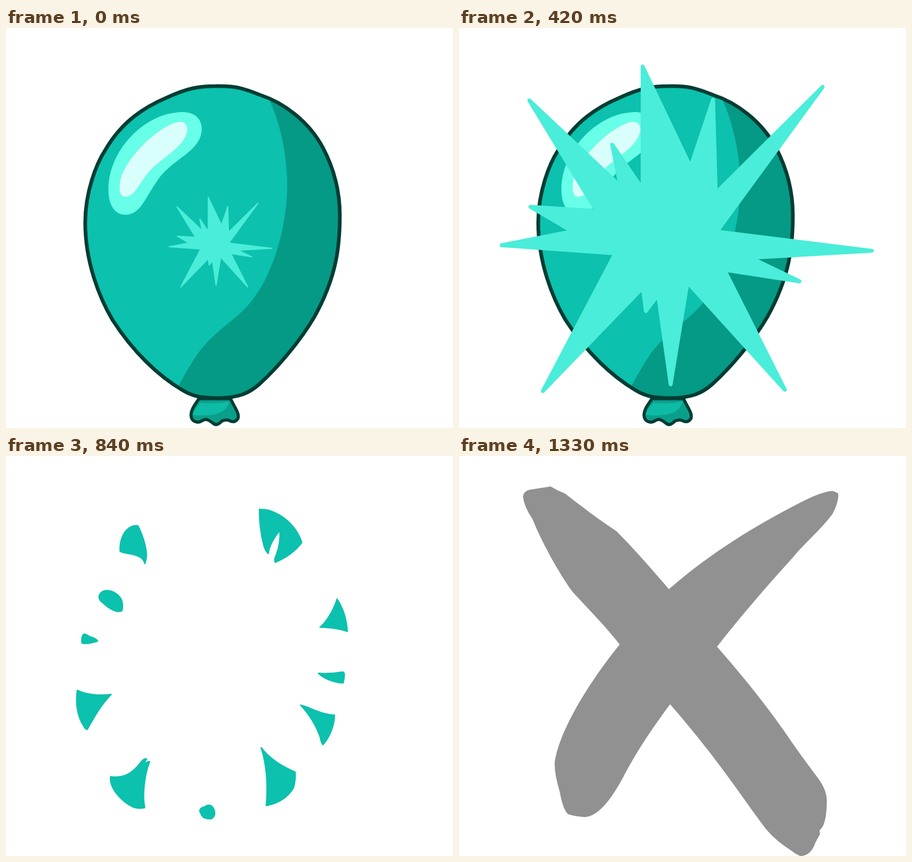
These frames come from a looping animation (790 px wide and 709 px high, 1400 ms). An HTML page with a canvas:

```html
<!DOCTYPE html>
<html lang="en">
<head>
<meta charset="utf-8">
<title>Balloon pop</title>
<style>
html, body { margin: 0; width: 100%; height: 100%; overflow: hidden; background: #fff; }
canvas { display: block; width: 790px; height: 709px; }
</style>
</head>
<body>
<canvas id="stage" width="790" height="709"></canvas>
<script>
const ctx = document.getElementById('stage').getContext('2d');
const STEP = 70, STEPS = 20, POP = 8, GONE = 16, CROSS = 19;
const BASE = '#0cc1ad', SHADE = '#059a86', LINE = '#003d33', BURST = '#4aedd9';
const GLOW = '#67ffe8', SHINE = '#d9fffc';

const shape = d => new Path2D(d);

function dot(x, y, r) {
  const path = new Path2D();
  path.arc(x, y, r, 0, Math.PI * 2);
  return path;
}

function fill(path, color) {
  ctx.fillStyle = color;
  ctx.fill(path);
}

function stroke(path, color, width) {
  ctx.strokeStyle = color;
  ctx.lineWidth = width;
  ctx.stroke(path);
}

function fillInside(clip, path, color) {
  ctx.save();
  ctx.clip(clip);
  fill(path, color);
  ctx.restore();
}

// Balloon
const body = shape('M371 103C405 102 420 107 450 119C490 132 535 165 560 212C580 250 590 290 590 332C590 385 585 440 545 512C520 555 480 602 448 631C430 647 412 656 371 656C345 656 328 652 312 642C270 617 225 575 188 517C165 478 140 415 140 345C140 290 160 240 175 217C205 165 245 140 285 123C320 107 340 103 371 103Z');
const bodyShade = shape('M465 126C485 170 497 225 497 280C496 340 482 400 455 452C425 505 400 515 370 543C340 570 330 590 306 632V720H700V100Z');
const glow = shape('M300 150C325 146 346 155 346 179C345 220 295 230 268 270C245 302 238 331 211 331C190 331 181 310 181 287C181 215 245 155 300 150Z');
const shine = shape('M300 169C313 165 320 171 319 182C314 210 280 225 255 250C235 272 228 297 211 298C202 298 201 285 203 272C210 235 262 182 300 169Z');
const knot = shape('M341 657C334 668 327 676 327 686C327 697 337 701 345 697Q351 693 355 694Q360 696 364 699Q371 706 378 700Q382 695 388 695Q393 694 397 697Q405 700 410 692C413 682 402 670 397 657Z');
const knotLight = shape('M343 664Q370 667 395 662C390 684 365 689 330 686C331 678 338 672 343 664Z');

function drawBalloon() {
  fill(knot, '#0a9f8b');
  fill(knotLight, '#0dbba6');
  stroke(knot, LINE, 5.5);
  fill(body, BASE);
  fillInside(body, bodyShade, SHADE);
  fill(glow, GLOW);
  fill(shine, SHINE);
  stroke(shine, '#e6f9fa', 2.5);
  stroke(body, LINE, 6.5);
}

// Burst: tips and notches clockwise around its middle; one outline, scaled over time
const MID = [377, 382], EDGE = 7;
const spikes = [
  [324, 65], [410, 243], [450, 124], [456, 290], [645, 102], [459, 360], [733, 395],
  [519, 408], [605, 450], [472, 430], [578, 644], [405, 454], [374, 635], [351, 476],
  [329, 505], [323, 463], [146, 646], [273, 400], [72, 385], [197, 360], [123, 316],
  [240, 323], [122, 126], [283, 278], [269, 204], [323, 283]];
const burst = new Path2D();
for (const [x, y] of spikes) {
  const dx = x - MID[0], dy = y - MID[1];
  const inset = 1 - EDGE / 2 / Math.hypot(dx, dy);
  burst.lineTo(dx * inset, dy * inset);
}
burst.closePath();

const growth = [
  { step: 0, x: 372, y: 387, size: .277 },
  { step: 4, x: 377, y: 382, size: .493 },
  { step: 6, x: 377, y: 382, size: 1 },
  { step: 7, x: 370, y: 376, size: 1.135 }];

function drawBurst(step) {
  const i = Math.max(1, growth.findIndex(g => g.step >= step));
  const a = growth[i - 1], b = growth[i], k = (step - a.step) / (b.step - a.step);
  const at = key => a[key] + (b[key] - a[key]) * k;
  ctx.save();
  ctx.translate(at('x'), at('y'));
  ctx.scale(at('size'), at('size'));
  fill(burst, BURST);
  stroke(burst, BURST, EDGE);
  ctx.restore();
}

// Shards: centre, drift and size halfway through the flight, outline, [detail, colour]...
const shard = (x, y, dx, dy, half, d, ...details) =>
  ({ x, y, dx, dy, power: -Math.log2(1 - half), path: shape(d), details });

const shards = [
  shard(301, 239, -76, -82, .48,
    'M318 169C332 195 348 240 350 275Q349 300 343 310C338 290 325 280 285 273Q262 270 252 264C250 235 258 205 275 186Q295 165 318 169Z',
    [shape('M303 180Q313 182 312 192C305 215 296 225 290 245Q283 265 271 263Q262 255 265 235C272 205 285 185 303 180Z'), GLOW],
    [shape('M302 189Q308 192 303 202C290 225 285 230 280 243Q275 252 270 246Q268 235 278 215Q292 192 302 189Z'), SHINE]),
  shard(264, 304, -79, -47, .48,
    'M248 265C275 264 300 285 306 305Q310 325 306 340Q298 345 283 342C260 335 245 320 228 305Q218 295 222 282Q230 266 248 265Z',
    [dot(242, 289, 17), GLOW], [dot(242, 290, 5.5), SHINE]),
  shard(201, 332, -53, -8, .47,
    'M184 314Q192 318 203 324C218 328 228 334 231 340Q228 344 218 345Q190 353 172 349Q168 335 174 320Q178 313 184 314Z',
    [dot(184, 332, 11), GLOW], [dot(185, 332, 4.5), SHINE]),
  shard(443, 228, 42, -87, .65,
    'M386 157Q410 156 428 166C462 181 490 212 501 247C480 275 455 290 429 301Q425 295 432 280C442 255 443 235 442 213C430 228 412 255 410 277Q402 270 398 255C390 225 386 190 386 157Z',
    [shape('M484 200Q489 235 483 270L510 250Z'), SHADE]),
  shard(506, 317, 73, -35, .55,
    'M517 265C537 295 548 330 550 370Q520 358 462 356C480 342 505 305 517 265Z',
    [shape('M518 262Q532 310 521 366L555 375V262Z'), SHADE]),
  shard(478, 385, 97, 8, .56,
    'M437 371Q480 373 512 367Q519 366 519 375Q519 390 515 402C485 400 455 388 437 371Z',
    [shape('M505 365Q507 385 500 405H525V365Z'), SHADE]),
  shard(464, 436, 87, 41, .57,
    'M411 374C440 380 470 402 516 405C515 440 500 475 480 497Q474 490 472 475C460 440 440 405 411 374Z',
    [shape('M499 400Q492 438 464 458L480 500H520V400Z'), SHADE]),
  shard(418, 481, 63, 87, .6,
    'M368 396C390 425 425 450 468 468Q470 490 463 515C445 545 415 562 383 567C388 510 385 450 368 396Z',
    [shape('M421 440C424 485 411 535 384 570H475V440Z'), SHADE]),
  shard(287, 411, -132, 39, .57,
    'M236 350C265 365 310 367 341 363C310 395 290 430 267 472Q262 472 257 463C234 430 231 385 236 350Z'),
  shard(285, 494, -66, 86, .58,
    'M226 474C265 479 290 468 320 428Q330 417 336 420Q328 432 326 440Q335 428 345 428C330 465 322 530 330 569Q310 573 295 567C260 550 222 510 226 474Z'),
  shard(362, 580, -6, 51, .56,
    'M362 559Q371 556 379 565Q386 575 385 587Q383 598 373 602Q360 602 350 598Q342 590 338 578Q337 570 345 566Q354 564 362 559Z',
    [dot(362, 580, 40), '#0ba18e'],
    [shape('M340 590Q350 596 361 590Q372 590 387 579V604H345Z'), '#058675'],
    [shape('M357 560Q378 556 381 566Q370 575 360 568Z'), '#058675'])
];

function drawShards(step) {
  const u = (step - POP) / (GONE - POP);
  const travel = (u - .3 * u * u) / .425; // slows down; 1 halfway
  for (const s of shards) {
    const size = 1 - u ** s.power;
    ctx.save();
    ctx.translate(s.x + s.dx * travel, s.y + s.dy * travel);
    ctx.scale(size, size);
    ctx.translate(-s.x, -s.y);
    fill(s.path, BASE);
    if (step === POP) {
      for (const [path, color] of s.details) fillInside(s.path, path, color);
    }
    stroke(s.path, step === POP ? LINE : BASE, 3.8);
    ctx.restore();
  }
}

const cross = shape('M113 72Q115 60 130 59L162 54Q175 62 188 67C215 88 250 115 278 133C310 165 340 200 371 236C430 185 500 135 610 79Q645 62 661 62L670 66Q672 80 660 103C640 130 610 155 590 180C540 235 495 288 456 338C510 400 550 450 595 517Q615 545 630 565Q650 590 650 610Q650 645 642 658L637 664L638 670L630 685Q622 709 603 709Q595 706 588 700Q560 682 544 663C500 605 460 540 373 440C340 485 320 515 295 560Q255 639 222 640Q205 639 193 635Q184 628 178 595Q169 565 169 545C174 500 215 420 284 334C260 303 230 273 200 240C175 205 145 150 130 112Q115 90 113 72Z');

function draw(step) {
  ctx.fillStyle = '#fff';
  ctx.fillRect(0, 0, 790, 709);
  if (step < POP) {
    drawBalloon();
    drawBurst(step);
  } else if (step < GONE) {
    drawShards(step);
  } else if (step === CROSS) {
    fill(cross, '#919191');
  }
}

ctx.lineJoin = ctx.lineCap = 'round';
const start = performance.now();
function tick() {
  draw(Math.floor((performance.now() - start) / STEP) % STEPS);
  requestAnimationFrame(tick);
}
tick();
</script>
</body>
</html>
```
